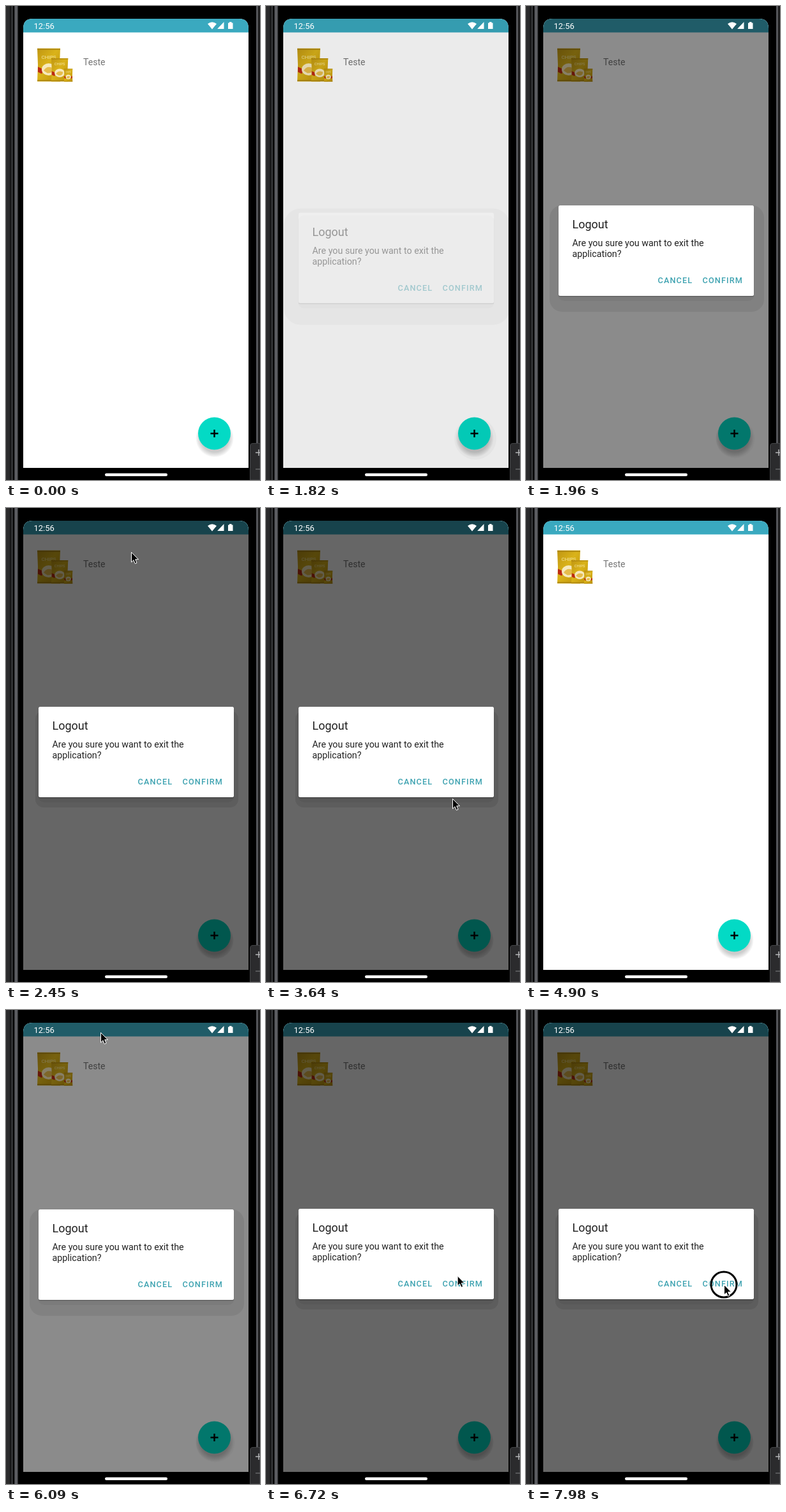
Animation, 398 px wide and 744 px high, one loop 8000 ms. Source, as an HTML page:

```html
<!DOCTYPE html>
<html lang="en">
<head>
<meta charset="utf-8">
<title>Logout dialog</title>
<style>
html, body { margin: 0; width: 100%; height: 100%; overflow: hidden; background: #000; }
svg { display: block; width: 398px; height: 744px; font-family: Roboto, sans-serif; }
.btn { font-size: 12.7px; font-weight: 500; letter-spacing: 1.12px; fill: #3fa3b1; }
</style>
</head>
<body>
<svg viewBox="0 0 398 744">
  <defs>
    <clipPath id="clip"><path id="shape" d="M27 725V35Q27 20 42 20H365Q380 20 380 35V725Z"/></clipPath>
    <linearGradient id="rim">
      <stop offset="0" stop-color="#3a3b3f"/><stop offset=".5" stop-color="#6b6c71"/><stop offset="1" stop-color="#2c2d30"/>
    </linearGradient>
    <linearGradient id="gold" x2="1" y2="1">
      <stop offset="0" stop-color="#c09612"/><stop offset=".45" stop-color="#dab31a"/><stop offset="1" stop-color="#bd9108"/>
    </linearGradient>
    <radialGradient id="soft">
      <stop offset=".72" stop-opacity=".2"/><stop offset=".9" stop-opacity=".08"/><stop offset="1" stop-opacity="0"/>
    </radialGradient>
    <g id="bag">
      <path d="M0 0H36L35 26 36 52H0L1 26Z" fill="url(#gold)"/>
      <path d="M0 1.5H36M0 50.5H36" stroke="#a98211" stroke-width="1.5"/>
      <path d="M1 29L10 33 7 40 1 37ZM35 29L27 33 29 40 35 37Z" fill="#bd2a12"/>
      <ellipse cx="18" cy="33" rx="11" ry="9.5" fill="#f6e9bd"/>
      <path d="M10 35Q15 26 25 31Q25 39 16 39Z" fill="#e6bd4c"/>
      <text x="18" y="16" font-size="8" text-anchor="middle" fill="#f5e6a4">CHIPS</text>
    </g>
  </defs>

  <rect width="398" height="744"/>
  <rect width="6" height="744" fill="#2b2b2c"/>
  <rect x="6" width="2" height="744" fill="#151516"/>
  <rect x="8" width="3" height="744" fill="#303133"/>
  <rect x="13" width="6" height="744" fill="url(#rim)"/>
  <rect x="392" width="3" height="744" fill="#55565a"/>
  <rect x="395" width="3" height="744" fill="#1c1c1d"/>

  <g clip-path="url(#clip)">
    <rect x="27" y="20" width="353" height="705" fill="#fff"/>
    <rect x="27" y="20" width="353" height="21.5" fill="#3aa9bf"/>
    <text x="121" y="93" font-size="14.1" fill="#757575">Teste</text>
    <use href="#bag" x="49" y="66.5"/>
    <use href="#bag" transform="translate(71 82) scale(.73 .7)"/>
    <use href="#bag" transform="translate(91 98.5) scale(.37 .39)"/>
    <circle id="halo" cx="328" cy="679"/>
    <circle cx="327" cy="678.5" r="30" fill="url(#soft)"/>
    <circle cx="326.5" cy="671" r="25.5" fill="#03dac5"/>
    <path d="M320.5 671H332.5M326.5 665V677" stroke="#000" stroke-width="2.4"/>
    <use id="dim" href="#shape"/>
    <rect id="outer"/>
    <rect id="inner"/>
    <g id="box">
      <rect x="51" y="1" width="306" height="142.5" rx="2.5" opacity=".2"/>
      <rect x="51" width="306" height="142" rx="2.5" fill="#fff"/>
      <text x="72.5" y="36" font-size="18" fill="#212121">Logout</text>
      <g font-size="14.3" fill="#212121">
        <text x="72.5" y="64">Are you sure you want to exit the</text>
        <text x="72.5" y="81">application?</text>
      </g>
      <text class="btn" x="206.5" y="122">CANCEL</text>
      <text class="btn" x="276.5" y="122">CONFIRM</text>
    </g>
  </g>

  <g fill="#fff">
    <text x="43.5" y="36" font-size="13">12:56</text>
    <path d="M316 28Q323 22.500 330 28L323 36.500Z"/>
    <path d="M331.5 36V35.5L341.5 25V36Z"/>
    <path d="M348 26.500H350V25H353.5V26.500H355.5V36H348Z"/>
    <rect x="155" y="733.5" width="98" height="4.5" rx="2.2"/>
  </g>

  <path d="M382.5 744V691Q382.5 686.5 387 686.500H398V744Z" fill="#2b2b2d" stroke="#424346"/>
  <path d="M391 701H398M396 696V706" stroke="#b5b6b8" stroke-width="1.5"/>
  <path d="M391 727H398" stroke="#66676a" stroke-width="1.5"/>

  <g id="ring" fill="none">
    <circle r="22.5" stroke="#fff" stroke-opacity=".7"/>
    <circle r="20" stroke="#000" stroke-width="3"/>
  </g>
  <path id="arrow" d="M.5 .5V16L4 12.700 6.300 18.300 9 17.200 6.700 11.700H11.500Z" stroke="#fff"/>
</svg>
<script>
const LOOP = 8000, STEP = 70, FADE = 310;
const $ = id => document.getElementById(id);
const clamp = v => Math.min(1, Math.max(0, v));
const smooth = k => k * k * (3 - 2 * k);
const speedUp = k => k ** 2;

// Pointer visits: stops of time, x, y and the easing towards that stop
const visits = [
  [[210, 287, 658], [560, 240, 166, speedUp]],
  [[2240, 188, 39], [2450, 196, 69, speedUp], [3080, 292, 456, smooth], [3920, 292, 456, smooth],
   [4270, 228, 428, smooth], [4480, 228, 428, smooth], [4830, 168, 40, speedUp]],
  [[5950, 150, 4], [6090, 148, 35, smooth], [6790, 304, 428, smooth], [6930, 305, 435, smooth],
   [7350, 305, 435, smooth], [7770, 310, 431, smooth], [LOOP, 310, 431, smooth]]
];
const presses = [[4270, 4410], [7980, LOOP]];
const opens = [1750, 5880], closes = 4380;

function pointerAt(t) {
  const stops = visits.find(v => t >= v[0][0] && t <= v[v.length - 1][0]);
  if (!stops) return null;
  const i = stops.findIndex((s, n) => n && t <= s[0]);
  const [t0, x0, y0] = stops[i - 1], [t1, x1, y1, ease] = stops[i];
  const k = ease((t - t0) / (t1 - t0));
  return [x0 + (x1 - x0) * k, y0 + (y1 - y0) * k];
}

// Drops in from below when opening, drifts up when closing
function dialogAt(t) {
  const closing = t >= closes && t < opens[1];
  const start = t < opens[1] ? opens[0] : opens[1];
  const shown = closing ? 1 - clamp((t - closes) / FADE) : clamp((t - start) / FADE);
  const rest = 1 - shown;
  return {
    dim: .6 * smooth(shown),
    alpha: clamp(shown * (closing ? 1.36 : 1.7)),
    y: 312 + (closing ? -3 * rest : 27 * rest ** 3),
    spread: Math.min(23, 5 + rest * (closing ? 56 : 28))
  };
}

function set(id, attrs) {
  for (const k in attrs) $(id).setAttribute(k, attrs[k]);
}

function shadow(id, left, right, top, bottom, rx, opacity) {
  set(id, { x: left, y: top, width: right - left, height: bottom - top, rx, opacity });
}

function place(id, p) {
  set(id, { visibility: p ? "visible" : "hidden" });
  if (p) set(id, { transform: `translate(${p[0]} ${p[1]})` });
}

function draw(t) {
  const { dim, alpha, y, spread } = dialogAt(t);
  const shade = alpha ? .02 + .11 * dim : 0;
  set("dim", { opacity: dim });
  set("halo", { r: 27 + spread * .26, opacity: dim ? .03 : 0 });
  shadow("outer", 51 - spread, 359 + spread, y + 10 - spread * .73, y + 153 + spread, 9 + spread * .75, shade);
  shadow("inner", 50, 358, y + 4, y + 150, 10, shade * .7);
  set("box", { opacity: alpha, transform: `translate(0 ${y})` });

  const p = pointerAt(t);
  place("arrow", p);
  place("ring", presses.some(([a, b]) => t >= a && t < b) && p);
}

const start = performance.now();
function tick() {
  const t = (performance.now() - start) % LOOP;
  draw(Math.floor(t / STEP) * STEP);
  requestAnimationFrame(tick);
}
tick();
</script>
</body>
</html>
```
